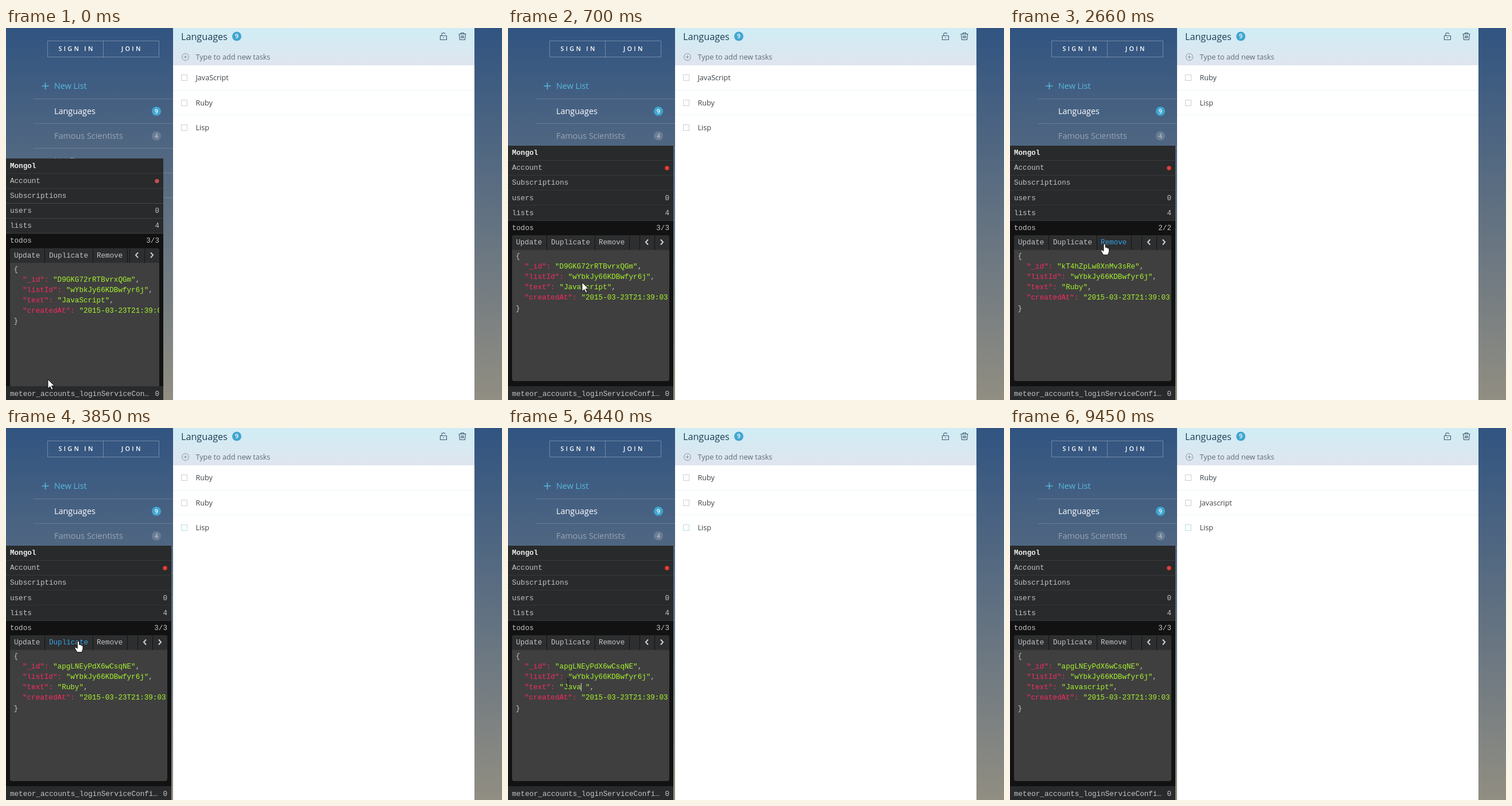
Write an HTML page that moves like this. It is 864 px wide and 648 px high and loops after 9.66 s.

```html
<!DOCTYPE html>
<html lang="en">
<head>
<meta charset="utf-8">
<title>Todo list with document inspector</title>
<style>
  html, body { margin: 0; width: 100%; height: 100%; overflow: hidden; background: #315481; }
  svg { display: block; width: 864px; height: 648px; }
  text { white-space: pre; font-family: "Open Sans", sans-serif; }
  .mono text { font: 12.6px "Liberation Mono", monospace; fill: #c4c4c4; }
  .mono .title { font-weight: bold; fill: #eee; }
  .mono .key { fill: #f92a62; }
  .mono .string { fill: #a6f22e; }
  .mono .hover { fill: #36a3e8; }
  .icon { fill: none; stroke: #3d5a6e; stroke-width: 1.1; }
</style>
</head>
<body>
<svg viewBox="0 0 864 648">
  <defs>
    <linearGradient id="sky" x2="0" y2="1"><stop stop-color="#315481"/><stop offset="1" stop-color="#918e82"/></linearGradient>
    <linearGradient id="head" x2="0" y2="1"><stop stop-color="#d0edf5"/><stop offset="1" stop-color="#dfe5ef"/></linearGradient>
  </defs>
  <rect width="864" height="648" fill="url(#sky)"/>
  <g id="sidebar"></g>
  <g id="content"></g>
  <g id="inspector" class="mono"></g>
  <g id="cursor"></g>
</svg>
<script>
const LOOP = 9660, STEP = 70, CHAR = 7.56;
const REMOVED = 2100, DUPLICATED = 3850, CLICKED = 5180, SELECTED = 5250, SAVED = 7980, RELEASED = 8330, LEAVING = 8680;

const layer = id => document.getElementById(id);
const rect = (x, y, w, h, fill, extra = '') => `<rect x="${x}" y="${y}" width="${w}" height="${h}" fill="${fill}" ${extra}/>`;
const path = (d, extra = 'class="icon"') => `<path d="${d}" ${extra}/>`;
const circle = (x, y, r, fill, extra = '') => `<circle cx="${x}" cy="${y}" r="${r}" fill="${fill}" ${extra}/>`;
const label = (x, y, s, size, fill, extra = '') => `<text x="${x}" y="${y}" font-size="${size}" fill="${fill}" ${extra}>${s}</text>`;
const mono = (x, y, s, cls = '') => `<text x="${x}" y="${y}" class="${cls}">${s}</text>`;
const monoEnd = (x, y, s) => `<text x="${x}" y="${y}" text-anchor="end">${s}</text>`;
const badge = (x, y, s, fill, color) =>
  circle(x, y, 8, fill) + label(x, y + 3.8, s, 10.5, color, 'text-anchor="middle" font-weight="600"');

// Cursor waypoints: time, x, y
const waypoints = [
  [0, 73, 612], [700, 129, 443], [980, 124, 407], [1190, 123, 398], [1610, 151, 387], [1890, 184, 378],
  [2450, 184, 378], [3080, 126, 371], [4550, 126, 371], [4690, 133, 397], [4900, 112, 448],
  [8610, 112, 448], [9450, 840, 660], [LOOP, 840, 660]
];

// Typing: time, letters present
const typing = [[6020, 1], [6230, 2], [6370, 3], [6440, 4], [6650, 5], [6790, 6], [6930, 7], [7070, 8], [7140, 10]];

function pointerAt(t) {
  const i = waypoints.findIndex(p => p[0] > t);
  const [t0, x0, y0] = waypoints[i - 1], [t1, x1, y1] = waypoints[i];
  const k = (t - t0) / (t1 - t0);
  return { x: x0 + (x1 - x0) * k, y: y0 + (y1 - y0) * k };
}

function drawSidebar() {
  const white = a => `rgba(255,255,255,${a})`;
  const buttonText = 'font-weight="600" letter-spacing="3.3"';
  layer('sidebar').innerHTML =
    path('M72.5 22.5H266.5V50.5H72.5ZM169.5 22.5V50.5', `fill="none" stroke="${white(.3)}"`) +
    label(91.5, 39.5, 'SIGN IN', 10.8, '#fff', buttonText) +
    label(201, 39.5, 'JOIN', 10.8, '#fff', buttonText) +
    path('M62.5 101H74.5M68.5 95V107', 'stroke="#58b8de" stroke-width="1.5"') +
    label(84, 106, 'New List', 14.4, '#58b8de') +
    label(84, 149.5, 'Languages', 14.4, '#fff') +
    label(84, 192.5, 'Famous Scientists', 14.4, white(.42)) +
    label(84, 235.5, 'List B', 14.4, white(.42)) +
    badge(262, 145, 9, '#40a5cf', '#fff') +
    badge(262, 188, 4, white(.16), white(.5)) +
    [123, 166, 209, 252, 295].map(y => rect(48, y, 243, 1, white(.17))).join('');
}

function drawContent(t) {
  const tasks = t < REMOVED ? ['JavaScript', 'Ruby', 'Lisp']
    : t < DUPLICATED ? ['Ruby', 'Lisp']
    : ['Ruby', t < SAVED ? 'Ruby' : 'Javascript', 'Lisp'];
  layer('content').innerHTML =
    rect(291, 0, 525, 648, '#fff') + rect(291, 0, 525, 65, 'url(#head)') +
    label(305, 20.5, 'Languages', 16.2, '#1c3f53') +
    badge(402, 14.5, 9, '#40a5cf', '#fff') +
    path('M756.5 13.5H767.5V20.5H756.5ZM759 13.5V11Q759 8.5 762 8.5Q764.5 8.5 765 10.5M762 16V18') +
    path('M788.5 10.5H801.5M792.5 10V8.5H797.5V10M789.5 11L790.5 20.5H799.5L800.5 11M793 13V18M795 13V18M797 13V18') +
    circle(312.5, 50.5, 6, 'none', 'stroke="#82929f"') +
    path('M309.5 50.5H315.5M312.5 47.5V53.5', 'stroke="#82929f"') +
    label(330.5, 55, 'Type to add new tasks', 12.6, '#5f6c78') +
    rect(291, 108, 525, 1, '#e5f4f7') + rect(291, 151, 525, 1, '#f0f8f9') +
    tasks.map((name, i) => {
      const y = [86.5, 130.5, 173.5][i];
      const stroke = i === 2 && t >= DUPLICATED ? '#b5dfe5' : '#cfcfcf';
      return rect(305.5, y - 5, 10, 10, '#fff', `stroke="${stroke}"`) + label(330.5, y + 4.5, name, 12.6, '#3b4147');
    }).join('');
}

// The edited "text" value, with its selection and caret while it has focus
function editedText(t, x, y) {
  if (t < REMOVED) return { value: 'JavaScript' };
  if (t < CLICKED) return { value: 'Ruby' };
  if (t >= SAVED) return { value: 'Javascript' };
  const typed = typing.filter(k => k[0] <= t).pop();
  if (!typed) {
    const mark = t >= SELECTED ? rect(x, y - 11, CHAR * 5, 15, '#3390ff') : '';
    return { value: 'Ruby ', under: mark };
  }
  const word = 'Javascript'.slice(0, typed[1]);
  return { value: word + ' ', over: rect(Math.round(x + CHAR * word.length), y - 11, 1, 14, '#ddd') };
}

function drawInspector(t, pointer) {
  const closed = Math.max(0, 1 - t / 350) ** 2;
  const width = 288 - 14 * closed, top = 205 + 22.6 * closed;
  const right = width - 7;
  const rowText = i => top + 16.2 + 26.1 * i;

  const count = t >= REMOVED && t < DUPLICATED ? '2/2' : '3/3';
  const rows = [['Mongol', ''], ['Account', ''], ['Subscriptions', ''], ['users', 0], ['lists', 4], ['todos', count]];
  const list = rows.map(([name, value], i) =>
    (i < 5 ? rect(0, top + 26.1 * i, width, 25.2, '#292a2b') + rect(0, top + 26.1 * i + 25.2, width, 1, '#47494a') : '') +
    mono(7, rowText(i), name, i ? '' : 'title') + monoEnd(right, rowText(i), value)).join('');

  const bar = top + 156, barText = bar + 16;
  const overBar = pointer.y < 386;
  const hover = !overBar ? '' : pointer.x > 151 ? 'Remove' : 'Duplicate';
  const buttons = [['Update', 14], ['Duplicate', 75], ['Remove', 158]]
    .map(([name, x]) => mono(x, barText, name, name === hover ? 'hover' : '')).join('');
  const dividers = [67, 151, 211, width - 59, width - 33].map(x => rect(x, bar, 1, 25.5, '#151515')).join('');
  const chevron = (x, dir) => path(`M${x + 2 * dir} ${bar + 7.5}L${x - 2 * dir} ${bar + 12}L${x + 2 * dir} ${bar + 16.5}`,
    'fill="none" stroke="#d0d0d0" stroke-width="2"');

  const line = i => bar + 40 + 18.1 * i;
  const id = t < REMOVED ? 'D9GKG72rRTBvrxQGm' : t < DUPLICATED ? 'kT4hZpLw8XnMv3sRe' : 'apgLNEyPdX6wCsqNE';
  const edit = editedText(t, 14 + CHAR * 11, line(3));
  const fields = [['_id', id], ['listId', 'wYbkJy66KDBwfyr6j'], ['text', edit.value], ['createdAt', '2015-03-23T21:39:03.581Z']];
  const json = mono(13.5, line(0), '{') + fields.map(([key, value], i) =>
    mono(29, line(i + 1), `"${key}":`, 'key') +
    `<text x="${14 + CHAR * (key.length + 6)}" y="${line(i + 1)}"><tspan class="string">"${value}"</tspan>${i < 3 ? ',' : ''}</text>`
  ).join('') + mono(13.5, line(5), '}');

  const room = Math.floor((width - 30) / CHAR);
  const footer = 'meteor_accounts_loginServiceConfiguration'.slice(0, room - 1) + '…';

  layer('inspector').innerHTML =
    `<clipPath id="box">${rect(7, bar, right - 7, 254, '#000', 'rx="4"')}</clipPath>` +
    rect(0, top, width, 648 - top, '#121212') + list +
    circle(width - 11, top + 39, 3.7, closed > 0 ? '#c94f4f' : '#e53c35') +
    `<g clip-path="url(#box)">` +
      rect(7, bar, right - 7, 254, '#3f3f3f') + rect(7, bar, right - 7, 25.5, '#2d2e2f') +
      dividers + buttons + chevron(width - 46, 1) + chevron(width - 20, -1) +
      (edit.under || '') + json + (edit.over || '') +
    `</g>` +
    rect(0, 624, width, 24, '#292a2b') + mono(7, 640.5, footer) + monoEnd(right, 640.5, 0);
}

function drawCursor(t, { x, y }) {
  const arrow = 'M0 0V16L3.8 12.6L6.6 18.2L9 17.2L6.4 11.4H11.3Z';
  const hand = 'M-1.7 1.5Q0 -1 1.7 1.5V6.5Q4 5.5 4.7 7.5Q7.5 7 8 9.5V14L6 19.5H-2L-6 13Q-7 10 -4 11L-1.7 13Z';
  const beam = 'M-3 0H-1L0 1L1 0H3M0 1V14M-3 15H-1L0 14L1 15H3';
  const white = 'fill="#fff" stroke="#000" stroke-width=".9" stroke-linejoin="round"';
  const editing = t >= CLICKED && t < RELEASED;
  const pointing = y < 386 || (t >= 4620 && t < LEAVING);
  layer('cursor').setAttribute('transform', editing ? 'translate(104.5 437)' : `translate(${x} ${y})`);
  layer('cursor').innerHTML = editing
    ? path(beam, 'fill="none" stroke="#0a0a0a"')
    : path(pointing ? hand : arrow, white);
}

let lastStep = -1;
function frame(now) {
  const t = Math.floor(now % LOOP / STEP) * STEP;
  if (t !== lastStep) {
    lastStep = t;
    const pointer = pointerAt(t);
    drawContent(t);
    drawInspector(t, pointer);
    drawCursor(t, pointer);
  }
  requestAnimationFrame(frame);
}

drawSidebar();
frame(performance.now());
</script>
</body>
</html>
```
